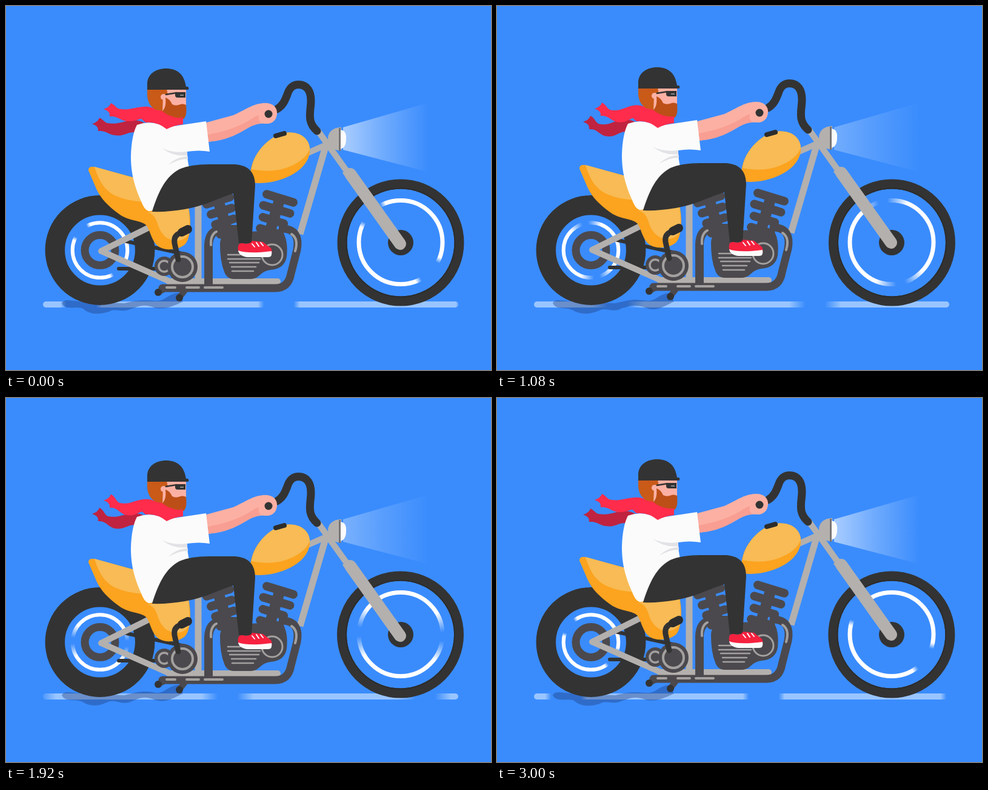
An HTML page with a canvas that plays this animation: 800 by 600 pixels, repeating every 3040 ms.

```html
<!DOCTYPE html>
<html lang="en">
<head>
<meta charset="utf-8">
<title>Biker</title>
<style>
html, body { margin: 0; width: 100%; height: 100%; overflow: hidden; background: #3a8cfd; }
canvas { display: block; }
</style>
</head>
<body>
<canvas id="stage" width="800" height="600"></canvas>
<script>
const ctx = document.getElementById('stage').getContext('2d');
const TAU = Math.PI * 2, rad = d => d * Math.PI / 180;
const SKY = '#3a8cfd', INK = '#333333', IRON = '#4b494d', STEEL = '#b3b0ae', SHINE = '#a3a09f';
const ORANGE = '#fca31f', YELLOW = '#f8bb55', SKIN = '#fbb0a3', BLUSH = '#f99e92';
const RED = '#ff2c4b', WINE = '#c0233f', HAIR = '#c95a18', BEARD = '#bc4f17', WHITE = '#fbfbfb';

const paths = {};
const shape = d => paths[d] ||= new Path2D(d);
function fill(color, d) {
  ctx.fillStyle = color;
  ctx.fill(shape(d));
}
function line(color, width, d, cap = 'round') {
  ctx.strokeStyle = color;
  ctx.lineWidth = width;
  ctx.lineCap = cap;
  ctx.lineJoin = 'round';
  ctx.stroke(shape(d));
}
function disc(color, x, y, r) {
  ctx.fillStyle = color;
  ctx.beginPath();
  ctx.arc(x, y, r, 0, TAU);
  ctx.fill();
}
function ring(color, x, y, r, width) {
  ctx.strokeStyle = color;
  ctx.lineWidth = width;
  ctx.beginPath();
  ctx.arc(x, y, r, 0, TAU);
  ctx.stroke();
}
function group(draw, x = 0, y = 0, tilt = 0) {
  ctx.save();
  ctx.translate(x, y);
  ctx.rotate(rad(tilt));
  draw();
  ctx.restore();
}

// Dashes slide left inside a fixed rounded bar, with soft moving ends
function road(f, blur) {
  const pitch = 326, gap = 59;
  const first = ((450 - 69.68 * f) % pitch + pitch) % pitch - pitch;
  ctx.save();
  ctx.beginPath();
  ctx.roundRect(61, 487, 685, 10, 5);
  ctx.clip();
  for (let x = first; x < 800; x += pitch) {
    const a = x + gap / 2 - blur / 2, b = x + pitch - gap / 2 + blur / 2, edge = blur / (b - a);
    const g = ctx.createLinearGradient(a, 0, b, 0);
    g.addColorStop(0, '#99c5fe00');
    g.addColorStop(edge, '#99c5fe');
    g.addColorStop(1 - edge, '#99c5fe');
    g.addColorStop(1, '#99c5fe00');
    ctx.fillStyle = g;
    ctx.fillRect(a, 487, b - a, 10);
  }
  ctx.restore();
}

// Two bright arcs with opposite gaps
function spin(x, y, r, width, angle, blur) {
  const g = ctx.createConicGradient(rad(angle), x, y);
  for (const turn of [0, 180]) {
    const stops = [[0, 0], [20 - blur / 2, 0], [20 + blur / 2, 1], [160 - blur / 2, 1], [160 + blur / 2, 0], [180, 0]];
    for (const [at, alpha] of stops) g.addColorStop((turn + at) / 360, `rgba(255,255,255,${alpha})`);
  }
  ring(g, x, y, r, width);
}

function beam(f) {
  const g = ctx.createLinearGradient(556, 0, 697, 0);
  g.addColorStop(0, '#ffffff98');
  g.addColorStop(.45, '#ffffff4c');
  g.addColorStop(1, '#ffffff00');
  ctx.globalAlpha = .57 + .38 * Math.cos(TAU * f / 38);
  fill(g, 'M556 200L702 158V275L556 237Z');
  ctx.globalAlpha = 1;
}

// A scarf end with a notched tip, rippling towards the left
function tail(color, x, y, phase) {
  const sway = lag => 2 * Math.sin(phase - lag);
  const tip = sway(0), mid = sway(1.5), root = sway(3) / 2;
  group(() => {
    ctx.fillStyle = color;
    ctx.beginPath();
    ctx.moveTo(0, tip);
    ctx.quadraticCurveTo(10, tip - 3, 12, tip - 10);
    ctx.bezierCurveTo(21, tip - 6, 20, mid + 2, 30, mid + 2);
    ctx.bezierCurveTo(46, mid + 4, 52, root - 4, 72, root - 4);
    ctx.bezierCurveTo(84, root - 3, 90, 4, 101, 4);
    ctx.lineTo(84, 20);
    ctx.bezierCurveTo(62, root + 9, 57, mid + 23, 42, mid + 22);
    ctx.bezierCurveTo(27, mid + 22, 25, tip + 11, 10, tip + 12);
    ctx.quadraticCurveTo(11, tip + 3, 0, tip);
    ctx.fill();
  }, x, y);
}

function shadow(f) {
  const wave = i => 2 * Math.sin(TAU * (i / 3 - f / 5));
  ctx.fillStyle = 'rgba(30,55,115,.38)';
  ctx.beginPath();
  ctx.moveTo(92, 490);
  ctx.bezierCurveTo(96, 480, 115, 488, 135, 488);
  ctx.lineTo(195, 490);
  ctx.bezierCurveTo(222, 483, 230, 484 + wave(1), 247, 486);
  ctx.bezierCurveTo(262, 487, 266, 475, 284, 473);
  ctx.lineTo(292, 487);
  ctx.bezierCurveTo(276, 495, 263, 502 + wave(2), 247, 498);
  ctx.bezierCurveTo(227, 490, 220, 495, 207, 499 + wave(0));
  ctx.bezierCurveTo(190, 507, 183, 497, 170, 502 + wave(1));
  ctx.bezierCurveTo(151, 510, 137, 508, 126, 500 + wave(2));
  ctx.bezierCurveTo(113, 495, 98, 502, 92, 490);
  ctx.fill();
}

function wheels(angle, blur) {
  const wobble = .5 * Math.cos(rad(angle * 2));
  ring(INK, 651 - wobble, 390, 96.5, 16);
  ring('#2c2c2c', 651 - wobble, 390, 89.5, 2);
  spin(651, 389.5, 69, 7, angle, blur);
  disc(INK, 651, 390, 21);
  ring(INK, 155, 402.5, 74.2, 32.5);
  spin(155, 402.5, 45.3, 6, angle, blur);
  ring(IRON, 155, 402.5, 25, 13);
}

function chassis() {
  line(INK, 6, 'M190 384L290 406M186 431H262');
  line(STEEL, 10, 'M248 357L157 402L270 452');
  line(STEEL, 11, 'M317 324V452M527 230L485 374', 'butt');
  line(STEEL, 10, 'M268 452H448M496 241L530 226');
}

function seat() {
  fill(ORANGE, 'M136 268C136 262 141 261 149 263L230 285L300 325C307 350 304 380 296 389C285 400 262 401 251 393C240 385 238 367 232 359C224 350 204 352 188 341C164 324 154 310 148 296Z');
  fill(YELLOW, 'M146 262L225 284L238 320Q205 320 184 311C164 303 154 288 146 262Z');
  fill(YELLOW, 'M232 338C242 338 247 345 251 359Q259 382 280 384Q293 385 302 373Q304 345 300 326Z');
}

function fins(x, y, tilt, step, widths) {
  group(() => {
    ctx.fillStyle = IRON;
    ctx.fillRect(-9, 0, 18, 80);
    widths.forEach((w, i) => {
      ctx.beginPath();
      ctx.roundRect(-w / 2, i * step - 7, w, 14, 7);
      ctx.fill();
    });
  }, x, y, tilt);
}

function engine() {
  fins(350, 319, -17, 18, [54, 50, 46, 40]);
  fins(452, 315, 17, 19, [60, 60, 50, 48]);
  line(IRON, 13, 'M258 463H444Q466 463 470 439L480 400Q486 366 456 365');
  line(IRON, 14, 'M334 461V392Q335 369 354 366H382');
  line(IRON, 10, 'M264 463L252 469M298 463L287 477');
  disc(INK, 251, 470, 6);
  disc(INK, 286, 479, 6);
  line(SHINE, 4, 'M265 462H279M298 462H318M328 462H357M338 392Q337 375 347 370M477 402Q483 382 471 374');
  fill(IRON, 'M353 391Q353 374 370 371L455 368Q466 383 463 411Q460 431 436 433Q426 434 418 442Q412 448 402 448H376Q364 448 360 436Q353 419 353 391Z');
  ring(SHINE, 439, 408, 17, 3);
  line(SHINE, 2.5, 'M366 408H386M366 415H419M369 421H417M372 428H412M373 435H408');
  disc(IRON, 261, 427, 16);
  ring(SHINE, 261, 427, 9, 3.5);
  disc(IRON, 291, 428, 25);
  ring(SHINE, 291, 428, 17, 4);
  line(INK, 9, 'M284 416L278 389Q276 376 288 372');
  line('#2d2d2d', 14, 'M290 371L300 366');
}

function front() {
  line(STEEL, 10, 'M514 203L562 270');
  line(STEEL, 13, 'M560 269L572 285', 'butt');
  line(STEEL, 20, 'M568 275L650 390');
  fill(STEEL, 'M553 198C538 198 531 207 531 217S538 237 553 236Z');
  fill(WHITE, 'M551 202Q562 203 561 217Q561 232 551 234Z');
  fill('#777475', 'M549 199H552V237H549Z');
  line(INK, 13, 'M447 168C457 162 460 154 464 144C468 131 475 127.5 483 127.5C497 128 503 139 503 154C503 166 500 174 502 186Q504 196 513 204');
}

function tank() {
  fill(ORANGE, 'M403 282C402 250 422 225 446 212C463 203 486 205 496 219C505 231 502 249 490 262C470 284 430 293 406 289Q403 287 403 282Z');
  fill(YELLOW, 'M405 267C408 244 426 222 446 212C463 203 486 205 496 219Q501 226 501 234C494 254 456 278 405 267Z');
  line('#2d2d2d', 8, 'M445 212L459 208');
}

function rider(f) {
  fill(SKIN, 'M327 191L375 178C399 167 409 158 428 158C441 158 448 166 447 176C446 188 437 193 427 192C410 190 399 200 387 206Q362 220 333 222Z');
  fill(BLUSH, 'M332 210Q374 203 402 186Q412 179 417 178Q415 187 421 191Q404 194 387 206Q362 220 333 222Z');
  disc(INK, 433, 176, 6.5);

  const phase = TAU * f / 5;
  tail(WINE, 142, 191, phase + .6);
  tail(RED, 161, 168, phase);
  fill(WHITE, 'M216 194Q240 185 264 198L330 188L336 238Q318 235 299 238Q299 252 302 264L246 331Q242 337 235 336Q228 334 223 320C209 289 206 267 206 245Q207 211 216 194Z');
  fill('#e1e2e5', 'M257 232Q274 241 299 238V244Q275 247 257 232ZM268 260Q281 246 300 246L300 250Q284 250 268 260Z');

  fill(HAIR, 'M233 134H268V177L254 172Q234 166 233 145Z');
  fill(SKIN, 'M265 134H297V162H270ZM259 145H268V176H258Z');
  disc(SKIN, 260, 148, 5);
  fill(BEARD, 'M263 149Q270 151 274 160Q279 163 285 161Q291 158 297 161Q299 179 293 184Q284 190 269 181L257 172Q265 166 263 149Z');
  line(INK, 2.5, 'M263 144L282 141', 'butt');
  fill(INK, 'M279 140H296V149H283Q279 149 279 145Z');
  line('#88898b', 2, 'M287 145H293', 'butt');
  fill(INK, 'M233 136V125C234 110 247 101 264 101C282 101 294 110 297 131L300 131Q303 134 300 136Z');

  fill(RED, 'M215 176Q234 164 257 171Q273 184 292 182V193Q279 194 265 201Q249 188 230 190Z');
  fill(INK, 'M241 337C251 305 263 279 286 267Q304 259 335 259H376C402 260 411 274 411 294L405 389H384L375 307C344 317 329 327 295 333Q266 338 241 337Z');

  fill('#f6213f', 'M383 401Q381 388 390 389Q402 392 406 385L424 387Q431 393 437 397Q440 403 437 409H388Z');
  fill(WHITE, 'M383 401Q400 407 438 402Q440 412 432 412H398Q384 410 383 401Z');
  line(WHITE, 2, 'M406 390L410 395M413 388L417 394M420 388L424 393');
}

function draw(now) {
  const f = Math.floor(now / 40) % 76;
  const still = f === 0 || f === 75;
  const angle = 45 + 47.88 * f;
  const bob = f % 2 ? 0 : 2;
  const kick = 2.7 * Math.max(0, 1 - Math.abs(f - 11) / 3);

  ctx.fillStyle = SKY;
  ctx.fillRect(0, 0, 800, 600);
  road(f, still ? 10 : 27);
  shadow(f);
  beam(f);
  wheels(angle, still ? 8 : 28);
  group(() => {
    chassis();
    group(() => {
      ctx.translate(-285, -330);
      seat();
    }, 285, 330 + bob / 2, kick);
    engine();
    front();
    tank();
    rider(f);
  }, 0, bob);
}

function loop() {
  draw(performance.now());
  requestAnimationFrame(loop);
}
loop();
</script>
</body>
</html>
```
